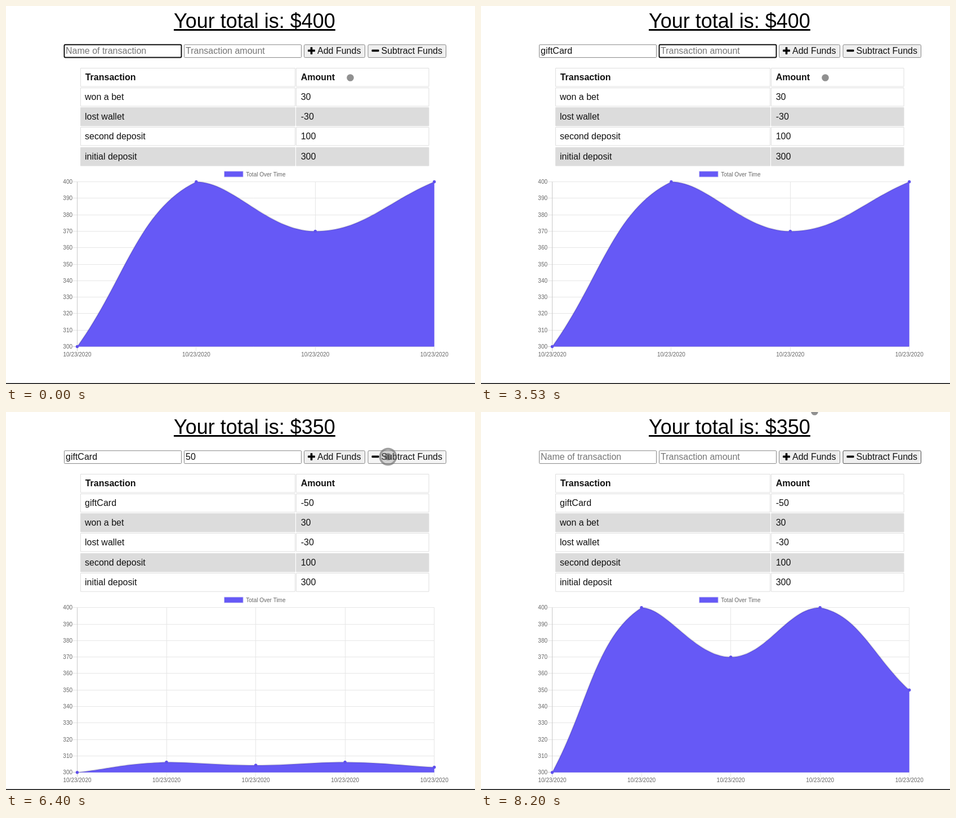
Animation, 833 px wide and 672 px high, one loop 8.26 s. Source, as an HTML page with a canvas:

```html
<!DOCTYPE html>
<html lang="en">
<head>
<meta charset="utf-8">
<title>Budget tracker</title>
<style>
  html, body { margin: 0; width: 833px; height: 672px; overflow: hidden; background: #fff; }
  canvas { position: absolute; left: 0; top: 0; }
  h1 {
    position: absolute; left: 298px; top: 6px; margin: 0;
    font: 36px/41px "Liberation Sans", Arial, sans-serif;
    text-decoration: underline; white-space: nowrap;
  }
</style>
</head>
<body>
<h1 id="total"></h1>
<canvas id="stage" width="833" height="672"></canvas>
<script>
const LOOP = 8260;
const FOCUS_AMOUNT = 3000, PRESS = 6260, UPDATE = 6384, RELEASE = 6450, CLEAR = 6500;
const BLINK = 530;
const NAME = 'giftCard', NAME_KEYS = [130, 400, 660, 860, 1730, 2200, 2400, 2730];
const AMOUNT = '50', AMOUNT_KEYS = [4460, 4530];
const HISTORY = [['won a bet', 30], ['lost wallet', -30], ['second deposit', 100], ['initial deposit', 300]];
const FONT = '"Liberation Sans", Arial, sans-serif';
const PURPLE = '#6659f6';
const CHART = { left: 126.5, right: 760.7, height: 293 };

const ctx = document.getElementById('stage').getContext('2d');
const heading = document.getElementById('total');

const clamp = (v, lo = 0, hi = 1) => Math.min(hi, Math.max(lo, v));
const mix = (a, b, u) => a + (b - a) * u;
const ease = u => u * u * (3 - 2 * u);

function text(str, x, y, { size = 16, color = '#111', weight = '', align = 'left' } = {}) {
  ctx.font = `${weight} ${size}px ${FONT}`;
  ctx.fillStyle = color;
  ctx.textAlign = align;
  ctx.fillText(str, x, y);
}

function box(x, y, w, h, { fill = '#fff', stroke, line = 1, radius = 0 } = {}) {
  ctx.beginPath();
  ctx.roundRect(x, y, w, h, radius);
  ctx.fillStyle = fill;
  ctx.fill();
  if (!stroke) return;
  ctx.strokeStyle = stroke;
  ctx.lineWidth = line;
  ctx.stroke();
}

function disc(x, y, r, color) {
  ctx.beginPath();
  ctx.arc(x, y, r, 0, Math.PI * 2);
  ctx.fillStyle = color;
  ctx.fill();
}

function segment(x1, y1, x2, y2, color) {
  ctx.beginPath();
  ctx.moveTo(x1, y1);
  ctx.lineTo(x2, y2);
  ctx.strokeStyle = color;
  ctx.lineWidth = 1;
  ctx.stroke();
}

function field(x, value, hint, focused, caret) {
  box(x + .5, 68.8, 208, 22.8, focused
    ? { stroke: '#101010', line: 2, radius: 2 }
    : { stroke: '#858585', radius: 1 });
  text(value || hint, x + 3, 85, { color: value ? '#111' : '#757575' });
  if (focused && caret) {
    const end = Math.round(x + 3 + (value ? ctx.measureText(value).width : 0));
    segment(end + .5, 71, end + .5, 89, '#111');
  }
}

function button(x, w, label, plus, fill, stroke) {
  box(x + .5, 68.8, w, 22.8, { fill, stroke, radius: 2 });
  box(x + 7, 77.6, 13, 3.6, { fill: '#000', radius: 1 });
  if (plus) box(x + 11.7, 73, 3.6, 13, { fill: '#000', radius: 1 });
  text(label, x + 24, 85);
}

// Visible for one blink after the latest keypress, then alternating.
const caretOn = (t, keys) => {
  const last = keys.filter(k => k <= t).pop();
  return last !== undefined && Math.floor((t - last) / BLINK) % 2 === 0;
};
const typed = (str, keys, t) => t >= CLEAR ? '' : str.slice(0, keys.filter(k => k <= t).length);

function drawForm(t, hover) {
  const onName = t < FOCUS_AMOUNT, onAmount = !onName && t < PRESS;
  field(103, typed(NAME, NAME_KEYS, t), 'Name of transaction', onName, caretOn(t, NAME_KEYS));
  field(316, typed(AMOUNT, AMOUNT_KEYS, t), 'Transaction amount', onAmount,
    caretOn(t, [FOCUS_AMOUNT, ...AMOUNT_KEYS]));
  const pressed = t >= PRESS && t < RELEASE;
  button(529, 108, 'Add Funds', true, '#efefef', '#858585');
  button(642.5, 138.5, 'Subtract Funds', false,
    pressed ? '#f5f5f5' : hover ? '#e5e5e5' : '#efefef',
    t >= RELEASE ? '#4a4a4a' : '#858585');
}

function drawTable(rows) {
  [['Transaction', 'Amount'], ...rows].forEach((row, i) => {
    const y = Math.round(110 + i * 35.15);
    const fill = i && i % 2 === 0 ? '#dcdcdc' : '#fff';
    const weight = i ? '' : 'bold';
    box(132.5, y + .5, 381, 32.6, { fill, stroke: '#dedede' });
    box(515.5, y + .5, 235.5, 32.6, { fill, stroke: '#dedede' });
    text(row[0], i ? 140 : 140.7, y + 22, { weight });
    text(row[1], 523.7, y + 22, { weight });
  });
}

// Cardinal-style spline with tension .4, handles kept inside the plot.
function withHandles(points, top, bottom) {
  return points.map((p, i) => {
    const a = points[i - 1] || p, b = points[i + 1] || p;
    const da = Math.hypot(p.x - a.x, p.y - a.y), db = Math.hypot(b.x - p.x, b.y - p.y);
    const handle = k => ({
      x: clamp(p.x + k * (b.x - a.x), CHART.left, CHART.right),
      y: clamp(p.y + k * (b.y - a.y), top, bottom)
    });
    return { ...p, before: handle(-.4 * da / (da + db)), after: handle(.4 * db / (da + db)) };
  });
}

function drawChart(rows, top, grow) {
  const { left, right, height } = CHART, bottom = top + height;
  const small = { size: 10, color: '#666' };
  box(387.3, top - 18.8, 34, 10.4, { fill: PURPLE, stroke: '#e0def5' });
  text('Total Over Time', 426.3, top - 10, small);

  for (let i = 0; i <= 10; i++) {
    const y = Math.round(top + i * height / 10 - .5) + .5;
    segment(118.5, y, right, y, i === 10 ? '#cfcfcf' : '#e6e6e6');
    text(400 - i * 10, 118, y + 3.4, { ...small, align: 'right' });
  }

  let sum = 0;
  const points = rows.map(r => r[1]).reverse().map((v, i) => ({
    x: mix(left, right, i / (rows.length - 1)),
    y: bottom - ((sum += v) - 300) / 100 * height
  }));
  points.forEach(({ x }, i) => {
    const gx = Math.round(x - .5) + .5;
    segment(gx, top, gx, bottom + 8, i ? '#e6e6e6' : '#c8c8c8');
    text('10/23/2020', x, bottom + 17, { ...small, align: 'center' });
  });

  const curve = withHandles(points, top, bottom);
  const Y = p => mix(bottom, p.y, grow);
  const trace = () => {
    ctx.beginPath();
    ctx.moveTo(curve[0].x, Y(curve[0]));
    for (let i = 1; i < curve.length; i++) {
      const p = curve[i - 1].after, q = curve[i].before;
      ctx.bezierCurveTo(p.x, Y(p), q.x, Y(q), curve[i].x, Y(curve[i]));
    }
  };
  trace();
  ctx.lineTo(right, bottom);
  ctx.lineTo(left, bottom);
  ctx.fillStyle = PURPLE;
  ctx.fill();
  trace();
  ctx.strokeStyle = 'rgba(0,0,0,.1)';
  ctx.lineWidth = 2.4;
  ctx.stroke();
  curve.forEach(p => disc(p.x, Y(p), 2.7, '#5f50ec'));
}

function pointer(t) {
  const go = ease(clamp((t - 5330) / 330)), leave = clamp((t - 7830) / 370) ** 2;
  return {
    x: mix(mix(611.5, 678.5, go), 592.5, leave),
    y: mix(mix(127.5, 79.5, go), -.5, leave)
  };
}

function drawPointer(t, { x, y }) {
  const u = (t - PRESS) / 320;
  if (u > 0 && u < 1) {
    const r = mix(8, 16, clamp(u * 2.3)), fade = clamp((1 - u) * 2);
    disc(x, y, r, `rgba(110,110,110,${.25 * fade})`);
    ctx.beginPath();
    ctx.arc(x, y, r - 2, 0, Math.PI * 2);
    ctx.strokeStyle = `rgba(100,100,100,${.5 * fade})`;
    ctx.lineWidth = 3.5;
    ctx.stroke();
  }
  disc(x, y, 6.3, 'rgba(70,70,70,.6)');
}

function growth(t) {
  const u = t < 6730 ? mix(.016, .25, clamp((t - 6400) / 330)) : clamp((t - 6480) / 1000);
  return 1 - (1 - u) ** 4;
}

let start;
function frame(now) {
  start ??= now;
  const t = (now - start) % LOOP;
  const updated = t >= UPDATE;
  const rows = updated ? [[NAME, -AMOUNT], ...HISTORY] : HISTORY;
  const total = rows.reduce((sum, r) => sum + r[1], 0);
  const mouse = pointer(t);
  const hover = mouse.x > 642 && mouse.y > 68 && mouse.y < 92;

  heading.textContent = `Your total is: $${total}`;
  ctx.clearRect(0, 0, 833, 672);
  drawForm(t, hover);
  drawTable(rows);
  drawChart(rows, updated ? 347.7 : 312.5, updated ? growth(t) : 1);
  box(0, 670.5, 833, 1.5, { fill: '#000' });
  drawPointer(t, mouse);
  requestAnimationFrame(frame);
}
requestAnimationFrame(frame);
</script>
</body>
</html>
```
